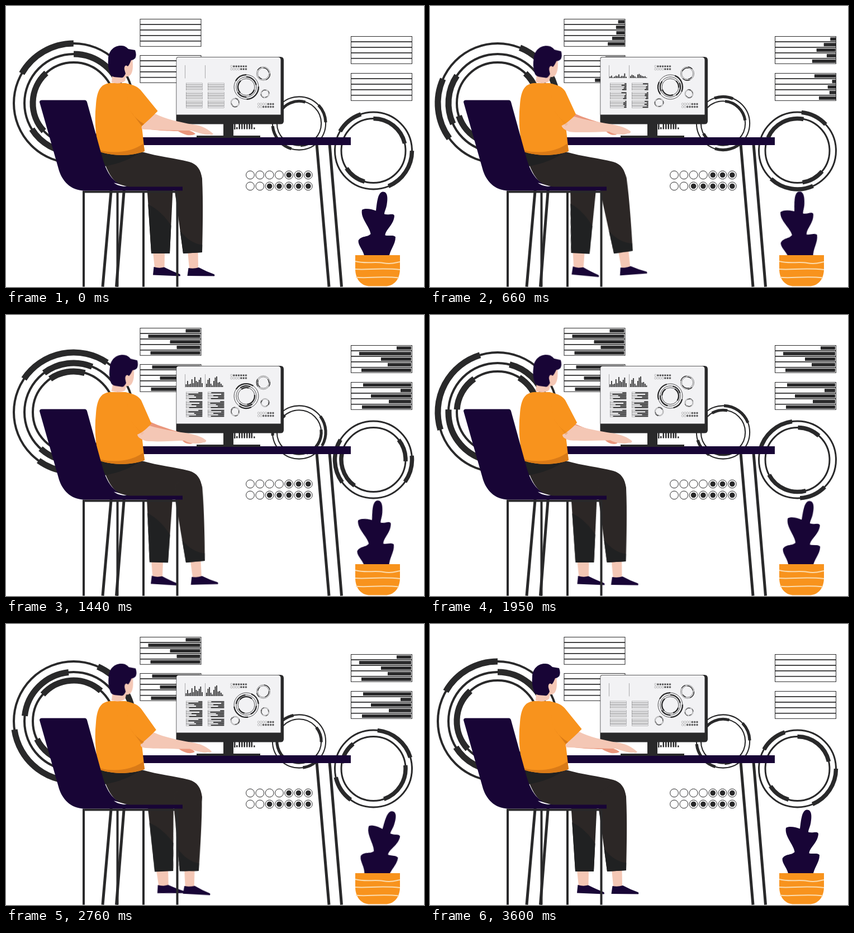
These frames come from a looping animation (748 by 503 pixels, 3630 ms). An HTML page:

```html
<!DOCTYPE html>
<html lang="en">
<head>
<meta charset="utf-8">
<title>Working at the desk</title>
<style>
@property --t { syntax: '<number>'; inherits: true; initial-value: 0; }
html, body { margin: 0; width: 100%; height: 100%; overflow: hidden; background: #fff; }
svg { display: block; width: 748px; height: 503px; --loop: 3630ms; --ease: cubic-bezier(.37,0,.63,1);
  animation: clock var(--loop) linear infinite; }
@keyframes clock { 0% { --t: 0 } 99.174%, 100% { --t: 3600 } }

.spin { transform: rotate(calc(var(--d) * var(--t) * .1deg)); }
.row { transform: scaleX(clamp(0, (var(--t) - var(--s)) / 900, 1)); }
.col { transform: scaleY(clamp(0, (var(--t) - var(--s)) / 900, 1)); }
.fade { opacity: clamp(0, (3600 - var(--t)) / 600, 1); }

.move { animation: var(--loop) var(--ease) infinite; }
#plant { transform-origin: 665px 446px; animation-name: sway; }
#nearLeg { transform-origin: 325px 300px; animation-name: nearLeg; }
#farLeg { transform-origin: 275px 300px; animation-name: farLeg; }
#head { transform-origin: 202px 135px; animation-name: nod; }
#nearArm { animation-name: nearArm; }
#farArm { animation-name: farArm; }
#sleeve { animation-name: sleeve; }
#crease { animation-name: crease; }

@keyframes sway {
  0%, 99.174%, 100% { transform: rotate(0deg) }
  24.793% { transform: rotate(-8.6deg) }
  74.38% { transform: rotate(8.6deg) }
}
@keyframes nearLeg {
  0%, 49.587%, 99.174%, 100% { transform: rotate(0deg) }
  24.793% { transform: rotate(-5.8deg) }
  74.38% { transform: rotate(2.5deg) }
}
@keyframes farLeg {
  0%, 49.587%, 99.174%, 100% { transform: rotate(0deg) }
  24.793% { transform: rotate(3.6deg) }
  74.38% { transform: rotate(-2.5deg) }
}
@keyframes nod {
  0%, 99.174%, 100% { transform: rotate(0deg) }
  24.793% { transform: rotate(4.5deg) }
}
@keyframes crease {
  0%, 99.174%, 100% { opacity: 1 }
  24.793% { opacity: 0 }
}
@keyframes nearArm {
  0%, 99.174%, 100% { d: path("M256 198L267 193C285 202 310 208 334 212C352 214 362 221 371 229C370 231 368 231 364 230Q358 231 352 229Q340 226 332 223C300 223 270 222 250 221Q240 221 243 216Z") }
  24.793% { d: path("M240 204L257 199C275 204 300 208 320 211C338 214 350 218 357 224C357 227 355 228 351 228Q346 231 339 230Q327 231 318 225C295 226 270 228 250 226Q236 221 234 214Z") }
}
@keyframes farArm {
  0%, 99.174%, 100% { d: path("M250 200L262 204C280 214 300 220 318 221C328 222 335 225 339 229Q334 232 324 231Q314 228 308 224C290 224 260 222 244 219Z") }
  24.793% { d: path("M248 185L256 189C275 198 300 205 318 211C326 214 330 222 334 229Q332 232 324 230Q318 228 314 222C295 216 270 206 246 202Z") }
}
@keyframes sleeve {
  0%, 99.174%, 100% { d: path("M213 138C230 141 238 146 243 153L271.5 188C262 198 252 207 243 215C235 208 227 198 221 186Z") }
  24.793% { d: path("M213 138C230 141 238 146 242 153L259 195C252 203 243 211 234 214C230 205 226 197 222 186Z") }
}

.ink { fill: #29292a; }
.line { fill: none; stroke: #29292a; }
.night { fill: #180536; }
.cloth { fill: #2c2726; }
.shade { fill: #202122; }
.skin { fill: #f4c7b5; }
.blush { fill: #ea967c; }
.orange { fill: #f8931d; }
.rust { fill: #d97a17; }
</style>
</head>
<body>
<svg viewBox="0 0 748 503">
  <g id="back"></g>

  <g class="line" stroke-width="5">
    <path d="M556 247L578 502.500M579 247L600.500 502.500"/>
    <path d="M189 320L173 502.500M212 320L197.500 502.500"/>
  </g>
  <path class="night" d="M190 235H617V249H190Z"/>

  <g id="monitor">
    <path class="ink" d="M408 211h2.500v10h-2.500zM412 217h2.500v3.500h-2.500zM416.500 211h2.500v9.500h-2.500zM421 211h2.500v9.500h-2.500zM425.500 211h2.500v9.500h-2.500zM430 211h2.500v9.500h-2.500zM434.500 211h2.500v9.500h-2.500zM438.500 211h2.500v9.500h-2.500zM443 217.500h2.500v3h-2.500z"/>
    <path class="ink" d="M389 210H407V232H455V236H341V232H389Z"/>
    <path class="ink" d="M309 91H491Q497 91 497 97V206Q497 211.500 491 211.500H309Q304.500 211.500 304.500 207V95Q304.500 91 309 91Z"/>
    <path fill="#f2f2f4" d="M309 91.800H486.500Q491.500 91.800 491.500 96.500V194.500H305.200V95.500Q305.200 91.800 309 91.800Z"/>
    <path d="M320.500 106V129.500M356.500 106V129.500" stroke="#8a8a8c" stroke-width=".7"/>
    <g id="screen"></g>
  </g>

  <g id="person">
    <g id="farLeg" class="move">
      <path class="skin" d="M263 440H284L283.500 469H266Z"/>
      <path class="night" d="M264.500 467Q274 470 283 467.500Q298 475 310 479.500Q313 481 311.500 483.500L263 481.500Z"/>
      <path class="cloth" d="M252 318L260 443H293L299 318Z"/>
      <path class="shade" d="M254.300 355C272 363 287 380 295.500 393L293 443H260Z"/>
    </g>
    <path class="cloth" d="M167 259C190 270 220 267 243 261C275 270 300 272 328 279C342 283 349 293 351 310L349 326H222C200 322 190 312 180 290Z"/>
    <path class="shade" d="M167 259C190 270 220 267 241 261.500C222 275 200 283 176 287Z"/>
    <g id="nearLeg" class="move">
      <path class="skin" d="M325 438H343.500L344 470H328Z"/>
      <path class="night" d="M326.500 469Q336 471 345 468Q358 475 372 480Q374 481 373 483.500L324.500 483Z"/>
      <path class="cloth" d="M303 302C301 320 302 335 304 345L317 443L351 441C352 400 353 350 351 310Q347 288 327 286Z"/>
      <path class="shade" d="M311.500 402C323 418 338 426 351.200 427.500L351 441L317 443Z"/>
    </g>

    <path id="farArm" class="move blush"/>
    <path class="orange" d="M187 138H213C228 142 236 148 238 160L243 215L248 260C222 270 190 268 168 261C160 235 158 205 161 176C163 153 168 139 187 138Z"/>
    <path class="rust" d="M167 258C195 266 228 260 246 246L248 260C222 270 190 268 168 261Z"/>
    <path id="nearArm" class="move skin"/>
    <path id="sleeve" class="move orange"/>
    <path id="crease" class="move rust" d="M222 187L243 215L247 211Q232 203 222 187Z"/>

    <g id="head" class="move">
      <path class="skin" d="M205 95H226C228 108 227 120 222 124Q218 127 215 126L213 134Q204 141 189 137L191 115Z"/>
      <path class="night" d="M183 95C183 80 194 70 207 71C212 71 216 74 219 77L231 79Q234 87 231.500 93Q228 97 224 97C222 102 220 106 218 108C214 104 211 108 212 114L214 121Q210 130 205 128C195 127 188 128 186 120C183 112 182 104 183 95Z"/>
    </g>
  </g>

  <g id="chair">
    <path class="line" stroke-width="4" d="M137 332.500H308M139 332V502.500M199.500 332V502.500M246 332V502.500M306.500 332V502.500"/>
    <path class="night" d="M60 172Q60 168.500 64 168.500H141Q144 168.500 145 172L172 270C182 308 200 323 222 323.500H316V330.500H140C115 330 101 313 95 295Z"/>
    <path fill="#fff" d="M193 316.500C200 318 208 321 216 323C207 323.500 199 321 193 316.500Z"/>
  </g>

  <path id="plant" class="move night" d="M642 452C641 438 630 430 630.500 420C635 411 648 414 652.500 408C651 395 634 380 637 365C643 361 655 364 662 366.500C664 352 665 334 674 332.500C684 332 683 346 681.500 355C680 364 677 368 677 372.500C685 375 693 370 695 375.500C694 392 679 400 678.500 410.500C686 412 694 409 697 413.500C697 428 686 437 685 452Z"/>
  <path class="orange" d="M625 446H705V470C705 492 692 501.500 679 501.500H651C638 501.500 625 492 625 470Z"/>
  <path fill="none" stroke="#fbdcae" stroke-width="2" d="M625 457C645 462 658 457 675 460S697 459 705 458M625 471C645 473 670 468 705 472M626 485.500C645 488 670 483 703 486.500"/>
</svg>

<script>
const NS = 'http://www.w3.org/2000/svg';
const back = document.getElementById('back');
const screen_ = document.getElementById('screen');

function add(parent, tag, attrs) {
  const el = document.createElementNS(NS, tag);
  for (const k in attrs) el.setAttribute(k, attrs[k]);
  return parent.appendChild(el);
}

const group = (parent, x, y, k = 1) =>
  add(parent, 'g', { transform: `translate(${x} ${y}) scale(${k})` });

// Ring: radius, spin direction, start angle, then [from, sweep] of the thick arcs
function rings(parent, x, y, k, thin, thick, list) {
  const g = group(parent, x, y, k);
  for (const [r, dir, turn, ...arcs] of list) {
    add(g, 'circle', { r, class: 'line', 'stroke-width': thin });
    const s = add(g, 'g', { class: 'spin', style: `--d:${dir}` });
    for (const [from, sweep] of arcs)
      add(s, 'circle', { r, class: 'line', 'stroke-width': thick, pathLength: 360,
        'stroke-dasharray': `${sweep} ${360 - sweep}`, transform: `rotate(${from + turn})` });
  }
}

const triple = (parent, x, y, k) => rings(parent, x, y, k, 4, 11, [
  [107, -1, 0, [210, 60], [358, 90]],
  [88, 1, 0, [270, 78], [89, 59]],
  [73, -1, 0, [137, 91], [19, 51]]
]);

const double = (parent, x, y, k, dir, outer, inner) => rings(parent, x, y, k, 3, 7.5, [
  [69, dir, outer, [210, 41], [0, 67]],
  [57.5, -dir, inner, [270, 77], [106, 41]]
]);

// Five outlined rows whose bars grow from the right edge
const SIZES = [[26, 93, 54, 42, 89], [86, 19, 72, 40, 88]];
function panel(parent, x, y, k, sizes, starts) {
  const g = group(parent, x, y, k);
  starts.forEach((s, i) => {
    const top = i * 9.9;
    add(g, 'rect', { x: -109, y: top, width: 109, height: 9.2, class: 'line', 'stroke-width': 1 });
    const f = add(g, 'g', { class: 'fade' });
    add(f, 'rect', { x: -sizes[i] - 1.5, y: top + 1.7, width: sizes[i], height: 6, class: 'ink row', style: `--s:${s}` });
  });
}

function dots(parent, x, y, k, open) {
  const g = group(parent, x, y, k);
  open.forEach((n, j) => {
    for (let i = 0; i < 7; i++) {
      const at = { cx: i * 17.3, cy: j * 20 };
      add(g, 'circle', { ...at, r: 7.4, class: 'line', 'stroke-width': 1 });
      if (i >= n) add(g, 'circle', { ...at, r: 4.8, class: 'ink' });
    }
  });
}

function chart(x, heights, first) {
  const g = add(group(screen_, x, 129), 'g', { class: 'fade' });
  heights.forEach((h, i) => add(g, 'rect', { x: i * 2.6, y: -h, width: 1.7, height: h,
    class: 'ink col', style: `--s:${first + i * 137 % 330}` }));
}

triple(back, 121, 174, 1);
double(back, 657.5, 259, 1, 1, 0, 0);
double(back, 524.5, 210, .69, -1, 107, -61);
panel(back, 349, 23.5, 1, SIZES[0], [255, 507, 408, 183, 354]);
panel(back, 349, 88.5, 1, SIZES[1], [300, 300, 318, 300, 120]);
panel(back, 726.5, 54.5, 1, SIZES[0], [327, 453, 96, 318, 237]);
panel(back, 726.5, 120.5, 1, SIZES[1], [264, 354, 480, 408, 354]);
dots(back, 437, 302.5, 1, [4, 2]);

triple(screen_, 430, 145, .205);
double(screen_, 460.5, 121, .175, 1, 0, 0);
double(screen_, 463.5, 157, .11, -1, 107, -61);
double(screen_, 410, 173, .115, 1, 60, 20);
dots(screen_, 403.5, 108, .25, [1, 4]);
dots(screen_, 452, 175.5, .25, [4, 2]);
chart(321.5, [5, 11, 5, 6, 14, 7, 18, 11, 9, 13, 17, 7], 170);
chart(358, [6, 13, 16, 6, 3, 11, 17, 19, 8, 9, 6, 3], 110);
[351.5, 390.5].forEach((x, c) => [138, 154, 169.5].forEach((y, r) =>
  panel(screen_, x, y, .265, SIZES[(r + c) % 2],
    [0, 1, 2, 3, 4].map(i => 250 + (i * 97 + r * 61 + c * 43) % 260))));
</script>
</body>
</html>
```
